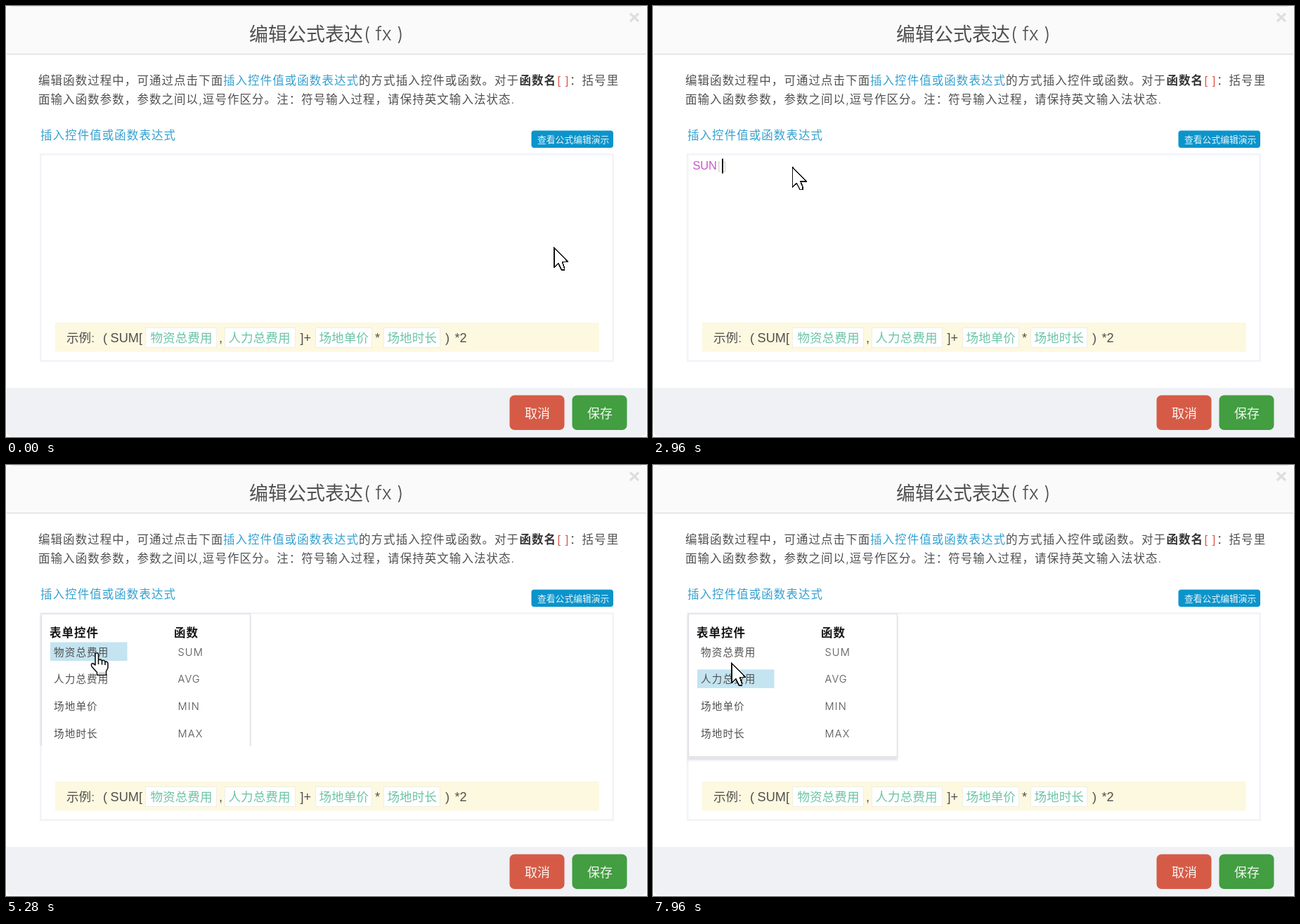
An HTML page for the animation above (8 s loop, 912x614 px).

```html
<!DOCTYPE html>
<html lang="zh-CN">
<head>
<meta charset="utf-8">
<title>编辑公式表达</title>
<style>
html, body { margin: 0; width: 100%; height: 100%; overflow: hidden; background: #fff; }
svg { display: block; width: 912px; height: 614px; }
text {
  font-family: Inter, "Noto Sans CJK SC", "Noto Sans CJK", sans-serif;
  font-weight: 300; fill: #505050; white-space: pre;
}
.body { font-size: 16.5px; letter-spacing: 1.05px; }
.item { font-size: 14.6px; letter-spacing: 1.1px; }
.head { font-size: 16.5px; letter-spacing: 1px; font-weight: 700; fill: #151515; }
.sample { font-size: 17.6px; }
.plain { font-family: "Liberation Sans", "Noto Sans CJK SC", sans-serif; }
.bold { font-weight: 700; fill: #333; }
.blue { fill: #35a1d1; }
.red { fill: #e2554e; }
.teal { fill: #6cc4a6; }
.white { fill: #fff; fill-opacity: .92; }
.pale { fill: #cfd5c0; font-size: 15px; }
</style>
</head>
<body>
<svg id="stage" viewBox="0 0 912 614" xmlns="http://www.w3.org/2000/svg"></svg>
<script>
const LOOP = 8000, STEP = 40;
const stage = document.getElementById('stage');

const text = (x, y, cls, str, style = '') =>
  `<text x="${x}" y="${y}" class="${cls}" style="${style}">${str}</text>`;
const rect = (x, y, w, h, fill, extra = '') =>
  `<rect x="${x}" y="${y}" width="${w}" height="${h}" fill="${fill}" ${extra}/>`;

const fields = ['物资总费用', '人力总费用', '场地单价', '场地时长'];
const functions = ['SUM', 'AVG', 'MIN', 'MAX'];
const rowY = i => 271.5 + 38.8 * i;
const chipX = [198, 311, 440, 537];

const frame = `
  ${rect(0, 0, 912, 614, '#fff')}
  <path d="M1 68V9Q1 1 9 1H903Q911 1 911 9V68Z" fill="#fafafa"/>
  <path d="M8 .5H904" stroke="#e3e4e8"/>
  <path d="M1 68.5H911" stroke="#d3d7da"/>
  <path d="M1 544H911V605Q911 613 903 613H9Q1 613 1 605Z" fill="#eff1f5"/>
  <path d="M888 10.5L900 22M900 10.5L888 22" stroke="#dedede" stroke-width="3.2"/>
  ${text(346, 49.5, '', '编辑公式表达', 'font-size:27px')}
  ${text(509, 49, '', '( fx )', 'font-size:26.5px')}`;

const intro =
  text(46, 112, 'body', '编辑函数过程中，可通过点击下面') +
  text(309, 112, 'body blue', '插入控件值或函数表达式') +
  text(502, 112, 'body', '的方式插入控件或函数。对于') +
  text(730.5, 112, 'body bold', '函数名') +
  text(784.5, 112, 'body plain red', '[ ]') +
  text(802, 112, 'body', '：括号里') +
  text(46, 139, 'body', '面输入函数参数，参数之间以,逗号作区分。注：符号输入过程，请保持英文输入法状态.') +
  text(49, 190, 'body blue', '插入控件值或函数表达式') +
  rect(747.5, 177.5, 116.5, 24.5, '#0b94cb', 'rx="4"') +
  text(756, 195, 'white', '查看公式编辑演示', 'font-size:12.8px');

const sample =
  rect(49.25, 211.25, 814.5, 294.5, '#fff', 'stroke="#f1f3f8" stroke-width="2.5"') +
  rect(70, 451, 774, 41.5, '#fdf8e0') +
  chipX.map((x, i) =>
    rect(x + .5, 458.5, i < 2 ? 101 - i : 80, 28, '#fff', 'stroke="#eeefe9"') +
    text(x + (i ? 5.5 : 7.5), 478.5, 'sample teal', fields[i])).join('') +
  text(86, 478.5, 'sample', '示例:') +
  [[138, '('], [148.5, 'SUM['], [303, ','], [418.5, ']+'], [525, '*'], [625, ')'], [638.5, '*2']]
    .map(([x, s]) => text(x, 478.5, 'plain', s, 'font-size:18.2px')).join('');

const buttons =
  rect(716.5, 554.5, 78, 49.5, '#d55b47', 'rx="7"') +
  rect(805.5, 554.5, 78, 49.5, '#429e41', 'rx="7"') +
  text(738, 586.5, 'white', '取消', 'font-size:18px') +
  text(827, 586.5, 'white', '保存', 'font-size:18px');

const editor = `
  <g id="formula">
    ${text(56.5, 233, 'plain', 'SUN', 'font-size:16.3px;fill:#c558cb')}
    ${text(92, 232.5, 'plain pale', '[')}
    <g id="chip">
      ${rect(99.5, 218.5, 80, 18.5, '#f8f9f8', 'stroke="#eaece9"')}
      ${text(102, 233.3, 'teal', '物资总费用', 'font-size:15px')}
    </g>
    <text id="comma" x="181" y="233" style="font-size:16px;fill:#222">,</text>
    <text id="close" y="232.5" class="plain pale">]</text>
    <rect id="caret" y="217.5" width="2" height="21" fill="#111"/>
  </g>`;

const menu = `
  <clipPath id="reveal"><rect id="window" x="44" y="208" width="312" height="0"/></clipPath>
  <filter id="shadow" x="-5%" y="-5%" width="110%" height="115%">
    <feDropShadow dx="0" dy="4.5" stdDeviation="1.8" flood-color="#55505f" flood-opacity=".17"/>
  </filter>
  <g clip-path="url(#reveal)">
    ${rect(50.5, 212, 297, 203.5, '#fff', 'stroke="#e1dee6" stroke-width="1.4" filter="url(#shadow)"')}
    <rect id="mark" height="26.5" fill="#c3e4f0"/>
    ${text(62, 245, 'head', '表单控件')}
    ${text(239, 245, 'head', '函数')}
    ${fields.map((s, i) => text(68, rowY(i), 'item', s)).join('')}
    ${functions.map((s, i) => text(244.5, rowY(i), 'item', s)).join('')}
  </g>`;

const pointer = `
  <g id="pointer" stroke="#111" fill="#fff" stroke-width="1.6" stroke-linejoin="round">
    <path id="arrow" shape-rendering="crispEdges"
      d="M.8 1V29.5L7 24L11.5 33H15.5V30L12.5 21.5H20.5Z"/>
    <g id="hand">
      <path d="M7 18V3Q7 .8 9.2 .8T11.5 3V11Q14 8.8 16.5 11.8Q19.5 10.3 21 13.2Q25 12.5 25 16V22L22.5 27V32.3H9.5V28.5L2 20Q.2 16 3.8 15.5Z"/>
      <path d="M11.5 10.5V17M16.5 11.5V17.5M21 13V18" fill="none"/>
      <path d="M12 29.5H21" stroke="#bbb" fill="none"/>
    </g>
  </g>`;

stage.innerHTML = frame + intro + sample + buttons + editor + menu + pointer;

const el = Object.fromEntries([...stage.querySelectorAll('[id]')].map(n => [n.id, n]));
const set = (node, attrs) => { for (const k in attrs) node.setAttribute(k, attrs[k]); };
const show = (node, on) => node.setAttribute('visibility', on ? 'inherit' : 'hidden');
const progress = (t, start, end) => Math.min(1, Math.max(0, (t - start) / (end - start)));
const glide = p => p * (1.35 - .35 * p);

// start, end, x, y, whether the pointer rests as a hand
const moves = [
  [520, 920, 151, 184, true],
  [1360, 1760, 252, 266, true],
  [2840, 3160, 133, 184, true],
  [4200, 4560, 120, 267, true],
  [6160, 6480, 129, 184, true],
  [7520, 7760, 109, 258, false],
  [7880, 7960, 111, 281, false]
];
const presses = [2000, 3360, 4760, 6680];
const openings = [1000, 3800, 7040];
const closings = [2360, 5120];
// from, to, x, row
const marks = [[1680, 2720, 239, 0], [4480, 5480, 63, 0], [7920, 8000, 63, 1]];

function pointerAt(t) {
  let x = 779, y = 343, hand = false;
  for (const [start, end, toX, toY, rest] of moves) {
    if (t <= start) break;
    const p = glide(progress(t, start, end));
    x += (toX - x) * p;
    y += (toY - y) * p;
    hand = rest && t >= end;
  }
  return { x, y, hand };
}

function menuOpen(t) {
  let open = 0;
  openings.forEach((start, i) => {
    if (t > start) open = 1 - (1 - progress(t, start, start + 360)) ** 2.5;
    if (t > closings[i]) open = 1 - progress(t, closings[i], closings[i] + 320) ** 3;
  });
  return open;
}

function render(t) {
  const { x, y, hand } = pointerAt(t);
  const press = presses.find(s => t > s && t < s + 360);
  const scale = press === undefined ? 1 : 1 - .1 * Math.sin(Math.PI * (t - press) / 360);
  set(el.pointer, { transform: `translate(${x.toFixed(2)} ${y.toFixed(2)})` });
  set(el.hand, { transform: `translate(13 16) scale(${scale}) translate(-13 -16)` });
  show(el.hand, hand);
  show(el.arrow, !hand);

  const open = menuOpen(t);
  set(el.window, { height: open > 0 ? 4 + 215 * open : 0 });
  const mark = marks.find(([from, to]) => t >= from && t < to);
  show(el.mark, mark);
  if (mark) set(el.mark, { x: mark[2], y: 252.5 + 38.8 * mark[3], width: 109.5 });

  const chip = t >= 5120, comma = t >= 5880;
  show(el.formula, t >= 2360);
  show(el.chip, chip);
  show(el.comma, comma);
  set(el.caret, { x: comma ? 185.5 : chip ? 182.5 : 98 });
  set(el.close, { x: comma ? 187.5 : chip ? 185.5 : 100 });
}

const origin = performance.now();
function tick() {
  const t = (performance.now() - origin) % LOOP;
  render(Math.floor(t / STEP) * STEP);
  requestAnimationFrame(tick);
}
render(0);
requestAnimationFrame(tick);
</script>
</body>
</html>
```
